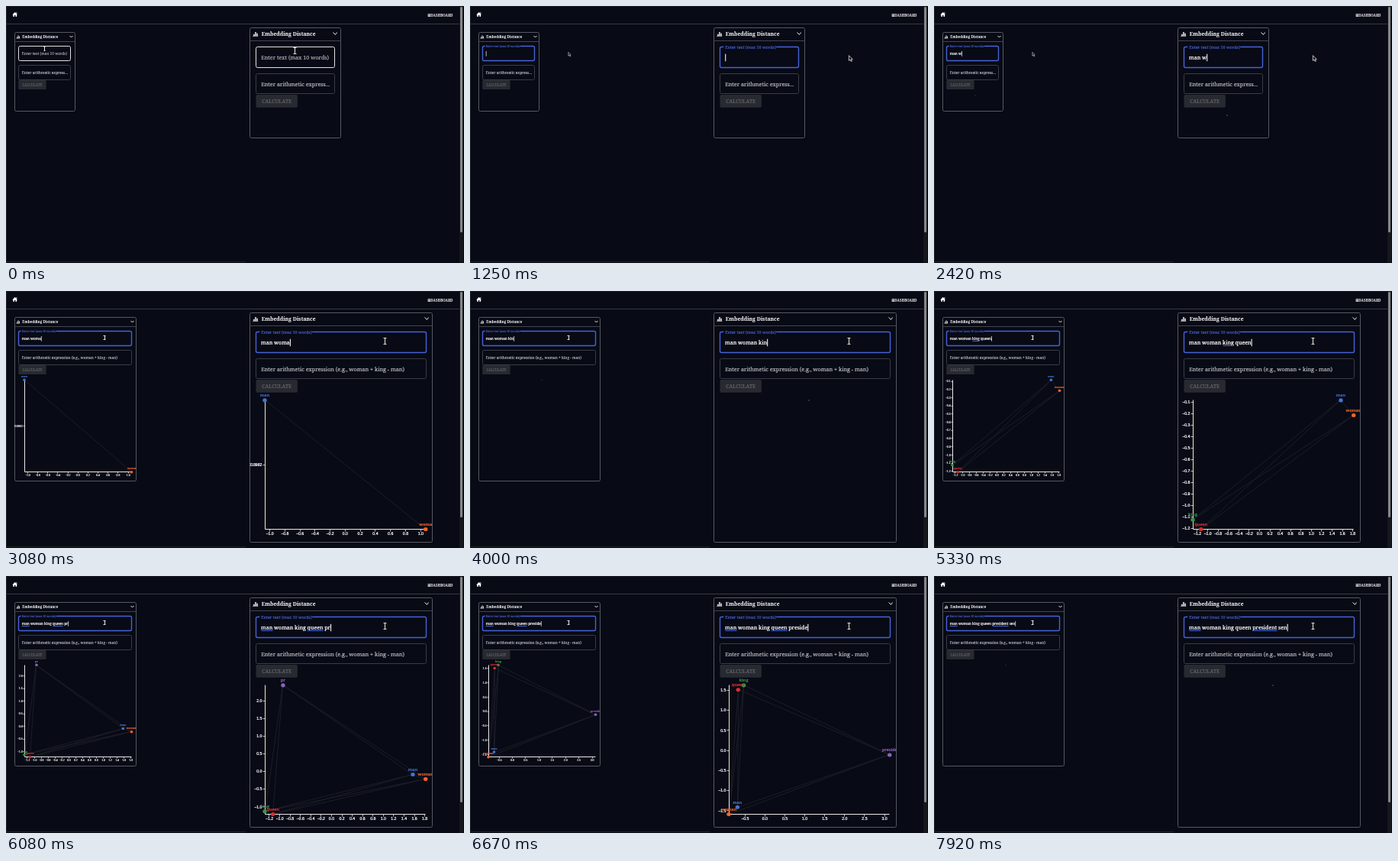
Write an HTML page with a canvas that moves like this. It is 600 by 336 pixels and loops after 8 s.

```html
<!DOCTYPE html>
<html lang="en">
<head>
<meta charset="utf-8">
<title>Embedding Distance</title>
<style>
html, body { margin: 0; height: 100%; overflow: hidden; background: #080a15; }
canvas { display: block; }
</style>
</head>
<body>
<canvas id="stage" width="600" height="336"></canvas>
<script>
const ctx = document.getElementById('stage').getContext('2d');
const LOOP = 8000, STEP = 1000 / 12, LOAD = 100, FOCUS = 165;
const BG = '#080a15', AXIS = '#e8e8ea';
const SERIF = '"Noto Serif", serif', SANS = '"Liberation Sans", sans-serif';
const COLORS = ['#4475cf', '#f9652b', '#35984a', '#d92f2f', '#8b63bd'];

// Each word starts at a time and is typed with an even gap between keys.
const KEYS = [
  { word: 'man', start: 1500, gap: 125 },
  { word: ' woman', start: 2170, gap: 190 },
  { word: ' king', start: 3500, gap: 145 },
  { word: ' queen', start: 4580, gap: 125 },
  { word: ' president', start: 5740, gap: 117 },
  { word: ' sen', start: 7590, gap: 83 }
].flatMap(({ word, start, gap }) => [...word].map((char, i) => ({ char, at: start + i * gap })));

const clamp = v => Math.max(0, Math.min(1, v));
const mix = (a, b, p) => a + (b - a) * p;

// Maps a point to the centre of the screen pixel it falls in.
function pixel(x, y) {
  const m = ctx.getTransform();
  return [Math.floor(m.a * x + m.e + .01) + .5, Math.floor(m.d * y + m.f + .01) + .5];
}

function stroke(color, width, trace) {
  ctx.save();
  ctx.resetTransform();
  ctx.beginPath();
  trace();
  ctx.strokeStyle = color;
  ctx.lineWidth = width;
  ctx.stroke();
  ctx.restore();
}

function line(points, color, width = 1) {
  const snapped = points.map(p => pixel(...p));
  stroke(color, width, () => snapped.forEach(p => ctx.lineTo(...p)));
}

function box(x, y, w, h, color, width = 1) {
  const [x0, y0] = pixel(x, y), [x1, y1] = pixel(x + w, y + h);
  stroke(color, width, () => ctx.roundRect(x0, y0, x1 - x0, y1 - y0, 2));
}

function rect(x, y, w, h, color, radius = 0) {
  ctx.beginPath();
  ctx.roundRect(x, y, w, h, radius);
  ctx.fillStyle = color;
  ctx.fill();
}

function shape(points, color) {
  ctx.beginPath();
  points.forEach(p => ctx.lineTo(...p));
  ctx.closePath();
  ctx.fillStyle = color;
  ctx.fill();
}

function text(str, x, y, size, color, { align = 'left', family = SERIF, weight = 'normal', ink = .17 } = {}) {
  ctx.font = `${weight} ${size}px ${family}`;
  ctx.fillStyle = ctx.strokeStyle = color;
  ctx.textAlign = align;
  ctx.lineWidth = ink;
  ctx.fillText(str, x, y);
  if (ink) ctx.strokeText(str, x, y);
}

function ticks(min, max) {
  const raw = (max - min) / 10, power = 10 ** Math.floor(Math.log10(raw)), e = raw / power;
  const step = power * (e >= 7.07 ? 10 : e >= 3.16 ? 5 : e >= 1.41 ? 2 : 1);
  const list = [];
  for (let i = Math.ceil(min / step); i * step <= max; i++) list.push(i * step);
  return list;
}

function polar(r, degrees) {
  const a = degrees * Math.PI / 180;
  return [r * Math.cos(a), r * Math.sin(a)];
}

// Two pairs of related words and one outlier form a triangle, which turns as the last word grows.
function layout(words) {
  if (words.length === 2) return [[-1.066, 1], [1.066, -1]];
  const grown = words.length === 5 && words[4].length > 5;
  const turn = grown ? -2 : 111;
  const pair = (r, angle, spread) => {
    const [x, y] = polar(r, turn + angle), [dx, dy] = polar(spread, turn - 139);
    return [[x - dx, y - dy], [x + dx, y + dy]];
  };
  return [...pair(1.7, -116, .14), ...pair(1.68, 113, .09), polar(grown ? 3.13 : 2.61, turn)]
    .slice(0, words.length);
}

function chart(words) {
  const data = layout(words), flat = words.length === 2;
  const xs = data.map(d => d[0]), ys = data.map(d => d[1]);
  const [x0, x1, y0, y1] = [Math.min(...xs), Math.max(...xs), Math.min(...ys), Math.max(...ys)];
  const px = v => mix(24, 164.5, (v - x0) / (x1 - x0));
  const py = v => mix(236.7, 116.2, (v - y0) / (y1 - y0));
  const points = data.map(([x, y]) => [px(x), py(y)]);
  const label = v => v.toFixed(1).replace('-', '−');

  ctx.save();
  ctx.beginPath();
  ctx.rect(11, 108, 159, 141);
  ctx.clip();
  points.forEach((a, i) => points.slice(i + 1).forEach(b => line([a, b], '#21232b', .8)));
  line([[24, 116.2], [24, 236.7], [164.5, 236.7]], AXIS);
  for (const v of ticks(x0, x1)) {
    line([[px(v), 236.7], [px(v), 238.6]], AXIS, .8);
    text(label(v), px(v), 242.2, 3.45, '#fff', { align: 'center', family: SANS });
  }
  for (const v of flat ? [0] : ticks(y0, y1)) {
    line([[22, py(v)], [24, py(v)]], AXIS, .8);
    text(flat ? '0.000000018982' : label(v), 21.6, py(v) + 1.2, 3.45, '#fff', { align: 'right', family: SANS });
  }
  points.forEach(([x, y], i) => {
    ctx.beginPath();
    ctx.arc(x, y, 1.8, 0, 7);
    ctx.fillStyle = COLORS[i];
    ctx.fill();
  });
  points.forEach(([x, y], i) => text(words[i], x, y - 3.4, 3.8, COLORS[i], { align: 'center' }));
  ctx.restore();
}

function typedText(value, caretOn) {
  text(value, 20.7, 64.1, 4.7, '#fff');
  const width = s => ctx.measureText(s).width;
  const done = value.split(' ').slice(0, -1);
  done.forEach((word, i) => {
    const latest = i > 1 && i === done.length - 1;
    const first = i === 0 && done.length > 3;
    if (!latest && !first) return;
    const x = 20.7 + width(value.slice(0, value.indexOf(word)));
    line([[x, 65.3], [x + width(word), 65.3]], '#3f63e0');
  });
  if (caretOn) rect(20.8 + width(value), 59, .7, 6.8, '#fff');
}

function pointer(t, wide) {
  const p = clamp((t - 80) / 420);
  const x = mix(50.5, 129.2, p), y = mix(56, 61, p) + 18 * Math.sin(Math.PI * p);
  if (wide || p < .3) {
    line([[x, y - 2.6], [x, y + 2.6]], '#eee');
    [-2.6, 2.6].forEach(d => line([[x - 1.4, y + d], [x + 1.4, y + d]], '#ddd'));
    return;
  }
  const arrow = [[0, 0], [0, 4.8], [1.1, 3.8], [2, 5.6], [2.7, 5.2], [1.9, 3.6], [3.3, 3.5]]
    .map(([dx, dy]) => [x - .3 + dx, y - .6 + dy]);
  shape(arrow, '#111');
  ctx.strokeStyle = '#e8e8e8';
  ctx.lineWidth = .55;
  ctx.stroke();
}

function panel(t) {
  const pressed = KEYS.filter(k => k.at <= t);
  const value = pressed.map(k => k.char).join('');
  const words = value.trim().split(' ');
  const letter = pressed.findLast(k => k.char !== ' ');
  const loading = letter && t - letter.at < LOAD;
  const wide = words.length > 2 || words.length === 2 && !(loading && words[1].length === 1);
  const focused = t >= FOCUS;
  const right = wide ? 170 : 90, field = right - 21.4;

  box(11, 34.5, right - 11, wide ? 214.3 : 102.5, '#565861');
  line([[11, 46.5], [right, 46.5]], '#42444d');
  [1.6, 3.6, 2.4].forEach((h, i) => rect(14.1 + i * 1.4, 42 - h, 1, h, '#eee'));
  rect(13.4, 42.2, 4.8, .5, '#ddd');
  text('Embedding Distance', 21.2, 42.3, 4.55, '#fff', { weight: 'bold', ink: 0 });
  const cx = right - 4.6;
  line([[cx - 1.7, 39], [cx, 40.7], [cx + 1.7, 39]], '#e8e8e8');

  box(16.3, 52.5, field, 19, focused ? '#4561d6' : '#e2e2e5', focused ? 1.4 : 1);
  const p = clamp((t - FOCUS) / 165);
  if (p > .3) rect(19.5, 51.4, 46, 2.4, BG);
  text('Enter text (max 10 words)', 20.8, mix(63.8, 54, p), mix(4.8, 3.6, p),
    focused ? '#4964d2' : '#b4b5ba', { ink: .1 });
  if (focused) {
    const last = pressed.length ? pressed.at(-1).at : 250;
    typedText(value, Math.floor((t - last) / 500) % 2 === 0);
  }

  box(16.3, 77.5, field, 18.7, '#3a3c45');
  text(wide ? 'Enter arithmetic expression (e.g., woman + king - man)' : 'Enter arithmetic express...',
    20.8, 88.9, 4.8, '#b0b1b6');
  rect(16.3, 97, 36.3, 12, '#282a31', 1.2);
  text('CALCULATE', 34.5, 104.8, 4.5, '#696b71', { align: 'center', ink: .08 });

  if (loading) rect(16.3 + field / 2 + 3, 115.9, .8, .7, '#8a8b90');
  else if (words.length > 1) chart(words);
  pointer(t, wide);
}

function page() {
  rect(0, 0, 600, 336, BG);
  rect(0, 23, 595, 1, '#383a42');
  rect(0, 0, 1, 336, '#24262c');
  rect(0, 0, 600, 1, '#1b1d24');
  rect(0, 334, 314, 1, '#22242a');
  rect(594, 0, 5, 336, '#15171d');
  rect(595, 1, 3, 295, '#86878a', 1.5);

  shape([[8.3, 11.4], [11.7, 8], [15.1, 11.4]], '#fff');
  rect(9.3, 11, 4.8, 3, '#fff');
  rect(10.9, 12, 1.6, 2, BG);
  rect(13.4, 8.3, .9, 2, '#fff');

  rect(552.6, 10.2, 3.4, 3.8, '#ccc');
  rect(553.6, 11.2, 1.2, 1, BG);
  text('DASHBOARD', 556.3, 13.7, 4.45, '#fff', { weight: 'bold', ink: 0 });
}

function draw(now) {
  const t = Math.floor((now % LOOP + 4) / STEP) * STEP;
  page();
  panel(t);
  ctx.save();
  ctx.translate(319.5, 28.5);
  ctx.scale(1.5, 1.4);
  ctx.translate(-11, -34.5);
  panel(t);
  ctx.restore();
  requestAnimationFrame(draw);
}
requestAnimationFrame(draw);
</script>
</body>
</html>
```
